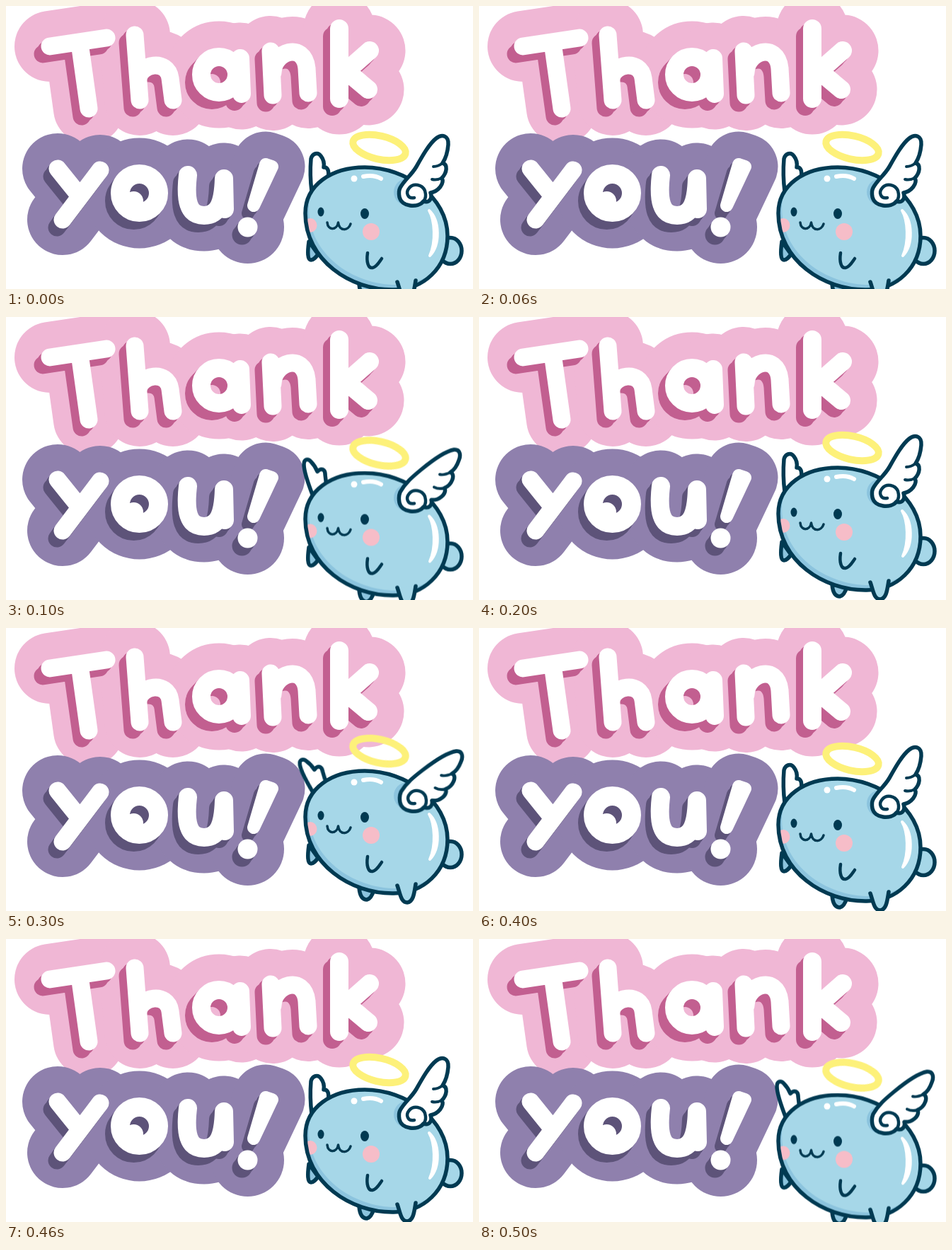
These frames come from a looping animation (660 px wide and 400 px high, 600 ms). An HTML page:

```html
<!DOCTYPE html>
<html lang="en">
<head>
<meta charset="utf-8">
<title>Thank you!</title>
<style>
  html, body { margin: 0; width: 100%; height: 100%; overflow: hidden; background: #fff; }
  svg { display: block; width: 100vw; height: 100vh; }

  /* lettering: one set of strokes, drawn as outline, shadow and face */
  .word { fill: none; stroke-linecap: round; stroke-linejoin: round; --pad: 0px; }
  .pen { stroke-width: calc(var(--w, 25px) + var(--pad, 0px)); }
  .outline { --pad: 75px; }
  .face { stroke: #fff; }
  .thank .outline { stroke: #f0b7d5; }
  .thank .shade { stroke: #c25f90; }
  .you .outline { stroke: #8f80ad; }
  .you .shade { stroke: #5d5379; }

  /* creature */
  .ink { stroke: #003a52; stroke-width: 5.5; stroke-linecap: round; stroke-linejoin: round; }
  .line { fill: none; }
  .skin { fill: #a6d7e8; }
  .dim { fill: #8cc4de; }
  .white { fill: #fff; }
  .dark { fill: #003a52; }
  .blush { fill: #f6bdc8; }

  .bob { animation: bob .6s step-end infinite; }
  .up { animation: up .6s step-end infinite; }
  .down { animation: down .6s step-end infinite; }
  .right.tilt { transform-origin: 577px 250px; animation: tilt-right .6s step-end infinite; }
  .left.tilt { transform-origin: 440px 235px; animation: tilt-left .6s step-end infinite; }

  @keyframes bob {
    0% { transform: translateY(15px); }
    16.667% { transform: translateY(7.5px); }
    33.333% { transform: translateY(0); }
    50% { transform: translateY(-11px); }
    66.667% { transform: translateY(0); }
    83.333%, 100% { transform: translateY(7.5px); }
  }
  @keyframes up {
    0%, 33.333%, 66.667% { visibility: visible; }
    16.667%, 50%, 83.333%, 100% { visibility: hidden; }
  }
  @keyframes down {
    0%, 33.333%, 66.667% { visibility: hidden; }
    16.667%, 50%, 83.333%, 100% { visibility: visible; }
  }
  @keyframes tilt-right {
    0%, 66.667%, 100% { transform: none; }
    50% { transform: translate(1px, 3px) rotate(2deg); }
  }
  @keyframes tilt-left {
    0%, 66.667%, 100% { transform: none; }
    50% { transform: rotate(-10deg); }
  }
</style>
</head>
<body>
<svg viewBox="0 0 660 400" role="img" aria-label="Thank you!">
  <defs>
    <g id="thank">
      <path class="pen" d="M62 57L142 45M104 52L117 145"/>
      <path class="pen" d="M182 41L189 133M187 103C189 82 228 74 232 102L236 133"/>
      <g style="--w:26px">
        <circle class="pen" cx="301" cy="97" r="25"/>
        <path class="pen" d="M331 74L333 124"/>
      </g>
      <path class="pen" d="M374 64L377 126M377 94C378 64 421 50 425 88L427 123"/>
      <path class="pen" style="--w:26px" d="M471 32L471 131M514 63L481 92L512 118"/>
    </g>
    <g id="you">
      <path class="pen" d="M73 230L102 266M133 232L80 302"/>
      <circle class="pen" style="--w:27px" cx="188.500" cy="264.500" r="27"/>
      <path class="pen" style="--w:26px" d="M257 239C253 274 257 296 280 296C302 296 307 274 308 244M308 244L309 287"/>
      <path class="pen" style="--w:18px" d="M367 224L376 227L350 282Z"/>
      <path class="pen" style="--w:28px" d="M341.500 312.500h.01"/>
    </g>
    <path id="body" d="M423 278C423 238 460 213 507 213C565 213 624 255 624 310C624 355 590 386 548 386C487 387 423 344 423 278Z"/>
    <clipPath id="inside"><use href="#body"/></clipPath>
    <path id="curl" class="ink line" style="stroke-width:4.500" d="M577 256C568 258 564 249 570 242C576 235 588 237 592 246C594 253 593 258 590 261"/>
  </defs>

  <g class="word thank">
    <use class="outline" href="#thank"/>
    <g class="shade">
      <use href="#thank" x="-5" y="5.500"/>
      <use href="#thank" x="-10" y="11"/>
    </g>
    <use class="face" href="#thank"/>
  </g>

  <g class="word you">
    <use class="outline" href="#you"/>
    <g class="shade">
      <use href="#you" x="-4" y="5.500"/>
      <use href="#you" x="-8" y="11"/>
    </g>
    <use class="face" href="#you"/>
  </g>

  <g class="bob">
    <ellipse cx="527.500" cy="185" rx="38" ry="16.500" transform="rotate(13 527.500 185)"
      fill="none" stroke="#fdf17a" stroke-width="10"/>

    <!-- parts behind the body -->
    <g class="ink white">
      <path class="up" d="M432 247C430 231 430 213 431 201C433 193 441 191 445 197C449 202 450 207 449 213C455 212 457 219 455 228Z"/>
      <g class="left tilt">
        <path class="down" d="M434 246C427 228 421 210 421 201C421 193 427 192 431 197C435 201 438 206 440 211C446 205 451 208 451 215L453 232Z"/>
      </g>
    </g>
    <g class="ink">
      <ellipse class="skin" cx="628" cy="331" rx="16" ry="18.500"/>
      <path class="dim" d="M428 318C426 333 426 344 431 344C435 344 438 340 441 336Z"/>
      <path class="dim" d="M499 378C500 390 504 395 510 395C515 394 518 388 520 381Z"/>
    </g>

    <!-- body and face -->
    <g clip-path="url(#inside)">
      <use class="dim" href="#body"/>
      <use class="skin" href="#body" x="5" y="-7"/>
      <rect class="skin" x="575" y="290" width="60" height="80"/>
      <ellipse class="dim" cx="567" cy="248" rx="19" ry="19"/>
      <ellipse class="blush" cx="430" cy="295" rx="9.500" ry="10"/>
    </g>
    <use class="ink line" href="#body"/>
    <path class="ink skin" d="M553 375C557 386 558 399 567 399C576 398 577 385 579 373"/>
    <circle class="blush" cx="516" cy="304" r="12"/>
    <ellipse class="dark" cx="445" cy="276" rx="4.500" ry="6.500"/>
    <ellipse class="dark" cx="507" cy="278.500" rx="6" ry="7.500"/>
    <path class="ink line" style="stroke-width:3.500" d="M454 291C455 303 468 302 469.500 291C471 304 484 303 487 293"/>
    <path class="ink line" style="stroke-width:4.500" d="M511 334C509 347 512 356 518 355C524 354 528 346 531 342"/>

    <!-- highlights -->
    <circle class="white" cx="492" cy="229" r="4.500"/>
    <path d="M505 226C514 224 523 225 530 229" fill="none" stroke="#fff" stroke-width="6" stroke-linecap="round"/>
    <path class="white" d="M598 274C606 288 608 318 599 338C614 322 613 288 598 274Z" stroke="#fff" stroke-width="4" stroke-linejoin="round"/>

    <!-- near wing -->
    <g class="up">
      <path class="ink white" d="M557 242C563 231 573 224 580 212C589 196 598 180 608 172C617 165 626 169 625 181C624 193 621 201 617 207C625 209 623 221 616 228C620 236 611 247 600 249C603 257 598 264 590 261C582 271 559 269 556 255C555 250 555 246 557 242Z"/>
      <path class="ink line" style="stroke-width:4" d="M617 207C612 211 608 212 604 212M616 228C610 231 606 231 602 230"/>
      <use href="#curl"/>
    </g>
    <g class="right tilt">
      <g class="down">
        <path class="ink white" d="M557 240C565 226 575 218 587 208C604 194 622 182 633 180C642 179 643 188 640 195C637 204 633 209 628 212C636 215 630 230 620 234C623 243 612 252 601 251C603 258 598 264 590 261C582 271 559 269 556 255C555 250 555 245 557 240Z"/>
        <path class="ink line" style="stroke-width:4" d="M628 212C622 215 617 216 613 215M620 234C614 236 609 235 605 233"/>
        <use href="#curl"/>
      </g>
    </g>
  </g>
</svg>
</body>
</html>
```
